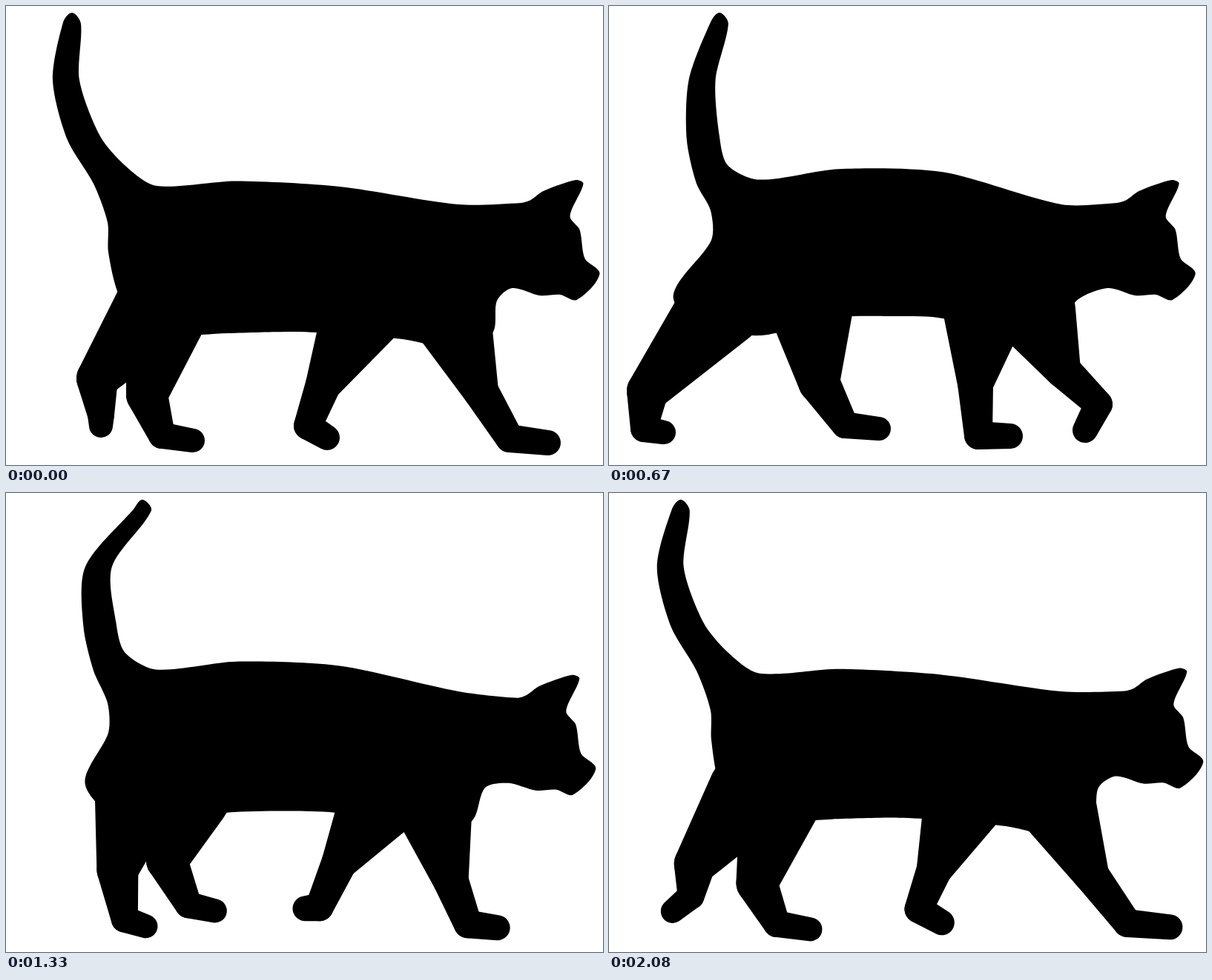
These frames come from a looping animation (805 px wide and 620 px high, 2160 ms). An HTML page with a canvas:

```html
<!DOCTYPE html>
<html lang="en">
<head>
<meta charset="utf-8">
<title>Walking cat</title>
<style>
html, body { margin: 0; width: 100%; height: 100%; overflow: hidden; background: #fff; }
canvas { display: block; }
</style>
</head>
<body>
<canvas id="stage" width="805" height="620"></canvas>
<script>
const LOOP = 2160, FPS = 12, CYCLE = 26, HALF = CYCLE / 2;
const ctx = document.getElementById('stage').getContext('2d');

// Swings between -1 and 1, highest at the peak step, n times per cycle.
const wave = (step, peak, n = 1) => Math.cos(2 * Math.PI * n * (step - peak) / CYCLE);

// One stride per kind of leg: phase, then x, y of knee, ankle and toe.
const fore = {
  hip: phase => [540 + 60 * wave(phase, -1), 412],
  radii: [55, 24, 19, 17],
  stride: [
    [0, 640, 520, 679, 584, 731, 590],
    [5, 562, 520, 577, 579, 612, 583],
    [8, 494, 510, 498, 580, 541, 581],
    [10, 473, 502, 456, 555, 493, 573],
    [13, 428, 511, 407, 567, 433, 583],
    [18, 497, 490, 482, 550, 443, 552],
    [21, 612, 492, 660, 538, 642, 573],
    [23, 655, 505, 718, 568, 771, 577]
  ]
};
const hind = {
  hip: phase => [212 + 62 * wave(phase, 20), 405],
  radii: [57, 28, 18, 16],
  stride: [
    [0, 190, 525, 210, 580, 252, 587],
    [5, 117, 503, 121, 573, 144, 583],
    [8, 52, 520, 47, 571, 74, 576],
    [10, 105, 500, 85, 536, 30, 563],
    [13, 123, 503, 128, 552, 128, 567],
    [18, 272, 495, 310, 558, 358, 564],
    [21, 283, 508, 318, 566, 364, 571],
    [23, 224, 525, 262, 582, 312, 590]
  ]
};

// Periodic Hermite spline through the unevenly spaced poses of a stride.
function poseAt(stride, phase) {
  const n = stride.length, i = stride.findLastIndex(row => row[0] <= phase);
  const [p0, p1, p2, p3] = [-1, 0, 1, 2].map(d => {
    const [t, ...xy] = stride[(i + d + n) % n];
    return { t: t + CYCLE * Math.floor((i + d) / n), xy };
  });
  const h0 = p1.t - p0.t, h = p2.t - p1.t, h2 = p3.t - p2.t, u = (phase - p1.t) / h;
  return p1.xy.map((a, c) => {
    const b = p2.xy[c], v0 = (a - p0.xy[c]) / h0, v = (b - a) / h, v2 = (p3.xy[c] - b) / h2;
    const m1 = h * (v0 * h + v * h0) / (h0 + h), m2 = h * (v * h2 + v2 * h) / (h + h2);
    return a + (b - a) * u * u * (3 - 2 * u) + m1 * u * (1 - u) ** 2 - m2 * u * u * (1 - u);
  });
}

// Two circles joined by their outer tangents.
function fillBone([ax, ay], ra, [bx, by], rb) {
  const dir = Math.atan2(by - ay, bx - ax), ratio = (ra - rb) / Math.hypot(bx - ax, by - ay);
  const spread = Math.acos(Math.max(-1, Math.min(1, ratio)));
  ctx.beginPath();
  ctx.arc(ax, ay, ra, dir + spread, dir - spread + 2 * Math.PI);
  ctx.arc(bx, by, rb, dir - spread, dir + spread);
  ctx.fill();
}

function drawLeg({ hip, radii, stride }, step) {
  const phase = step % CYCLE;
  const [kx, ky, ax, ay, tx, ty] = poseAt(stride, phase);
  const joints = [hip(phase), [kx, ky], [ax, ay], [tx, ty]];
  for (let i = 0; i < 3; i++) fillBone(joints[i], radii[i], joints[i + 1], radii[i + 1]);
}

// Smooth closed curve; handles scale with each segment so corners stay tight.
function fillSmooth(pts) {
  const n = pts.length;
  const dir = i => {
    const [ax, ay] = pts[(i + n - 1) % n], [bx, by] = pts[(i + 1) % n], len = Math.hypot(bx - ax, by - ay);
    return [(bx - ax) / len, (by - ay) / len];
  };
  ctx.beginPath();
  ctx.moveTo(...pts[0]);
  for (let i = 0; i < n; i++) {
    const j = (i + 1) % n, [ax, ay] = pts[i], [bx, by] = pts[j], d = dir(i), e = dir(j);
    const r = 0.27 * Math.hypot(bx - ax, by - ay);
    ctx.bezierCurveTo(ax + d[0] * r, ay + d[1] * r, bx - e[0] * r, by - e[1] * r, bx, by);
  }
  ctx.fill();
}

function drawTorso(step) {
  const sway = wave(step, 0), pace = wave(step, 0, 2), bob = 10 * wave(step, 23);
  const tip = 143 - 44 * wave(step, 2) - 15 * pace;
  const mid = 111 - 20 * sway - 10 * pace;
  const low = 64 + mid / 2;
  const nod = -7 * wave(step, 4);
  const belly = 428 + 12 * pace, chest = 644 + 18 * pace, breast = 627 + 30 * pace;
  const rump = 112 + 28 * pace + 12 * sway;

  const tail = [
    [137, 285 + bob], [118, 240], [low - 22, 180], [mid - 18, 100], [tip - 12, 22],
    [tip, 9], [tip + 12, 24], [mid + 18, 100], [low + 22, 175], [160, 215], [202, 239 + bob / 2]
  ];
  const back = [[310, 229 + bob], [450, 235 + bob * 1.2], [610, 268]];
  const head = [
    [690, 270], [703, 266], [720, 254], [764, 239], [774, 244], [756, 288], [769, 306],
    [776, 345], [796, 366], [765, 401], [743, 394], [715, 395], [678, 385]
  ].map(([x, y]) => [x + bob * 0.6, y + nod]);
  const under = [
    [chest, 398], [breast, 440], [breast - 35, 465], [535, 450], [450, belly + 3], [390, belly],
    [300, belly + 2], [205, 445], [rump + 30, 430], [rump, 390], [138, 325 + bob]
  ];
  fillSmooth([...tail, ...back, ...head, ...under]);
}

function draw(now) {
  const ms = Math.floor(now % LOOP / 10) * 10;
  const step = Math.floor((ms + 5) * FPS / 1000);
  ctx.fillStyle = '#fff';
  ctx.fillRect(0, 0, 805, 620);
  ctx.fillStyle = '#000';
  drawTorso(step);
  for (const leg of [fore, hind]) {
    drawLeg(leg, step);
    drawLeg(leg, step + HALF);
  }
  requestAnimationFrame(draw);
}
requestAnimationFrame(draw);
</script>
</body>
</html>
```
